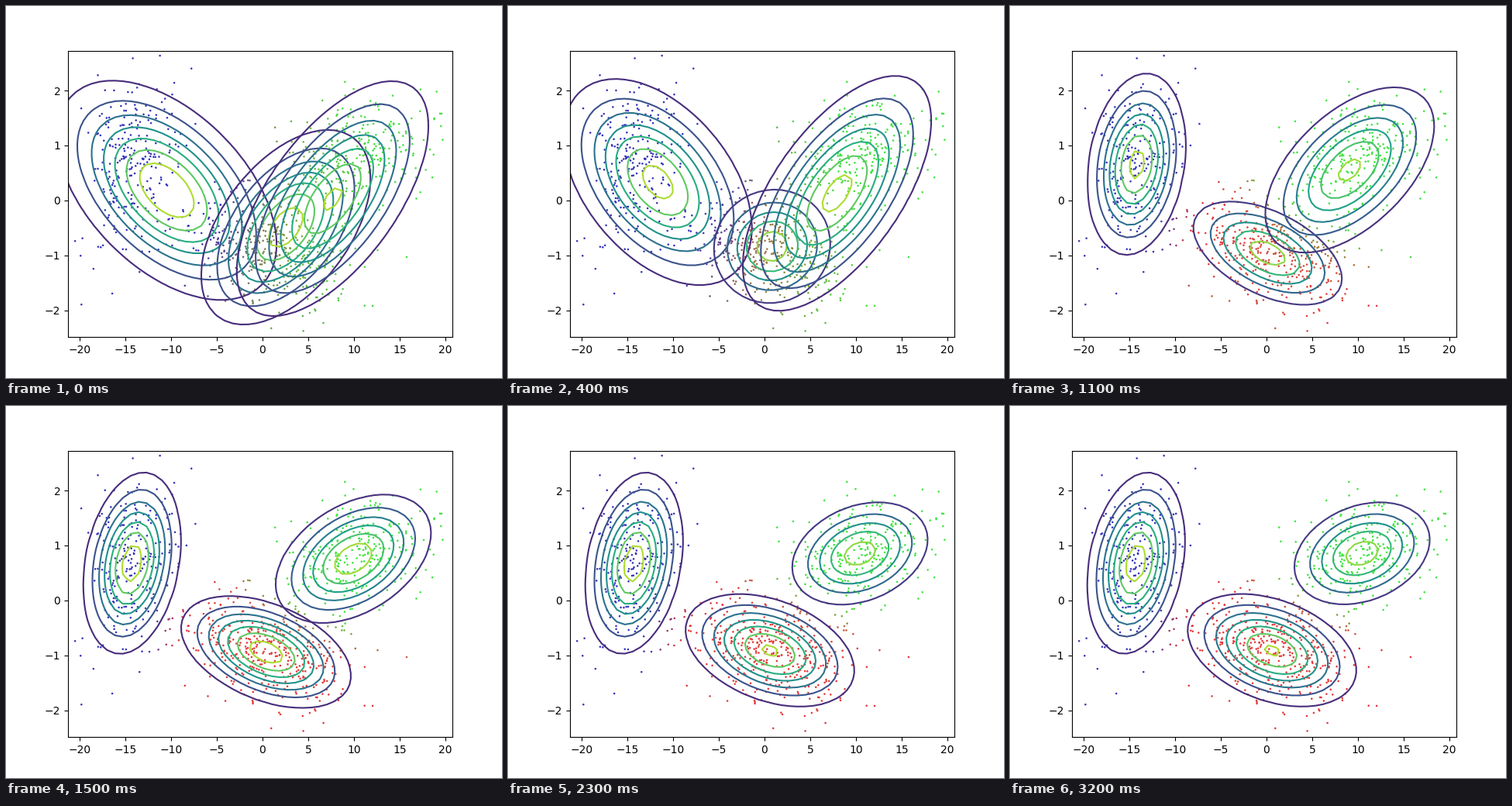
Write a matplotlib script that moves like this. It is 640x480 px and loops after 3.3 s.

```python
import numpy as np
import matplotlib.pyplot as plt
from matplotlib.animation import FuncAnimation

FRAMES = 33
XLIM, YLIM = (-21.267, 20.765), (-2.482, 2.724)
COLORS = np.array([[0.2, 0.2, 0.74], [0.9, 0.22, 0.22], [0.24, 0.9, 0.24]])


def gauss(weight, mx, my, sx, sy, rho):
    """Weight, mean and covariance of one mixture component."""
    cross = rho * sx * sy
    return weight, np.array([mx, my]), np.array([[sx ** 2, cross], [cross, sy ** 2]])


def pdf(points, mean, cov):
    d = points - mean
    dist = np.einsum("...i,ij,...j->...", d, np.linalg.inv(cov), d)
    return np.exp(-dist / 2) / (2 * np.pi * np.sqrt(np.linalg.det(cov)))


def sample(rng, n, mean, cov):
    """Normal sample whose mean and covariance are exactly those given."""
    z = rng.standard_normal((n, 2))
    z -= z.mean(axis=0)
    z = z @ np.linalg.inv(np.linalg.cholesky(np.cov(z.T, bias=True))).T
    return mean + z @ np.linalg.cholesky(cov).T


def expect(points, mix):
    resp = np.array([w * pdf(points, mean, cov) for w, mean, cov in mix])
    return resp / resp.sum(axis=0)


def maximize(points, resp):
    mix = []
    for r in resp:
        mean = r @ points / r.sum()
        d = points - mean
        mix.append((r.mean(), mean, (d.T * r) @ d / r.sum()))
    return mix


TRUTH = [gauss(0.27, -14.245, 0.676, 2.63, 0.819, 0.23),
         gauss(0.44, 0.636, -0.908, 4.687, 0.510, -0.355),
         gauss(0.29, 10.39, 0.859, 4.06, 0.497, 0.285)]
START = [gauss(0.41, -10.466, 0.186, 5.884, 0.978, -0.495),
         gauss(0.14, 2.542, -0.486, 4.582, 0.877, 0.50),
         gauss(0.45, 7.670, 0.035, 5.276, 1.076, 0.62)]

rng = np.random.default_rng(4)
points = np.vstack([sample(rng, round(930 * w), mean, cov)
                    for w, mean, cov in TRUTH])

# Expectation-maximization, one step per frame
mix, resp = START, expect(points, START)
history = []
for _ in range(FRAMES):
    history.append((mix, resp.T @ COLORS))
    resp = expect(points, mix)
    mix = maximize(points, resp)

gx, gy = np.meshgrid(np.linspace(*XLIM, 50), np.linspace(*YLIM, 50))
grid = np.dstack([gx, gy])

fig, ax = plt.subplots(figsize=(6.4, 4.8), dpi=100)
ax.set(xlim=XLIM, ylim=YLIM, autoscale_on=False)
dots = ax.scatter(*points.T, s=3.4, linewidths=0)
rings = []


def draw(frame):
    while rings:
        rings.pop().remove()
    mix, colors = history[frame]
    dots.set_facecolor(colors)
    for _, mean, cov in mix:
        rings.append(ax.contour(gx, gy, pdf(grid, mean, cov)))
    return [dots, *rings]


anim = FuncAnimation(fig, draw, frames=FRAMES, interval=100,
                     init_func=lambda: [dots], repeat=True, repeat_delay=0)
plt.show()
```
